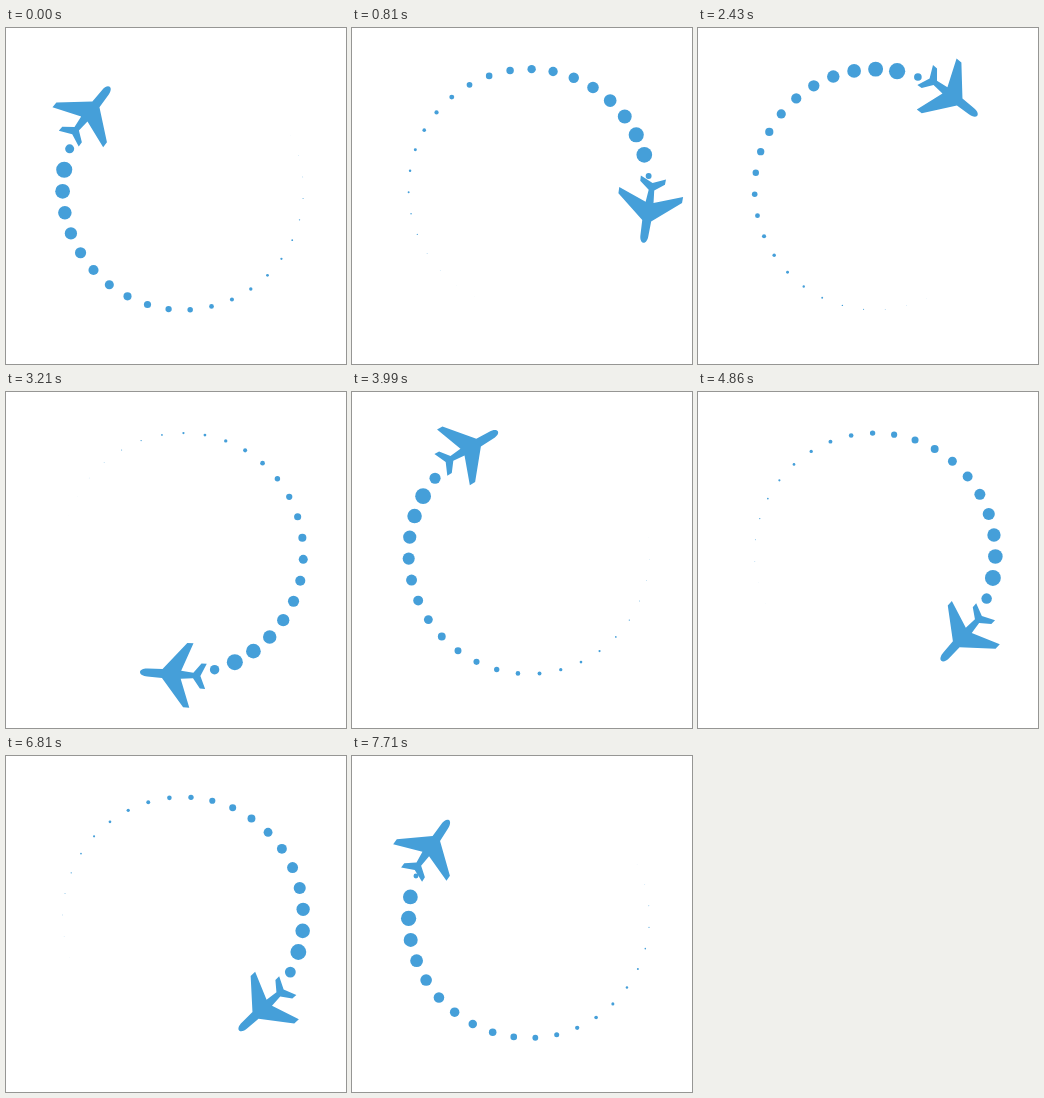
These frames come from a looping animation (340 px wide and 336 px high, 7740 ms). An HTML page:

```html
<!DOCTYPE html>
<html lang="en">
<head>
<meta charset="utf-8">
<title>Plane loader</title>
<style>
  html, body { margin: 0; width: 100%; height: 100%; overflow: hidden; background: #fff; }
  svg { display: block; width: 340px; height: 336px; fill: #459fd9; }
</style>
</head>
<body>
<svg viewBox="0 0 340 336">
  <g id="dots"></g>
  <!-- local axes: x points away from the ring centre, y along the flight -->
  <path id="plane" d="M0 30.5 C2.4 30.5 4 27 4 23 L4.5 8.2 L32.2 -14.8 L32.3 -21 L4 -10.5
    L2.8 -22.8 L12.5 -30.3 L12.7 -35.6 L0 -30 L-12.7 -35.6 L-12.5 -30.3 L-2.8 -22.8
    L-4 -10.5 L-32.3 -21 L-32.2 -14.8 L-4.5 8.2 L-4 23 C-4 27 -2.4 30.5 0 30.5 Z"/>
</svg>
<script>
const LOOP = 7740, TICK = 30;
const CX = 177, CY = 161.5, RADIUS = 120.4, PLANE_RADIUS = 121.2;
const COUNT = 35, GAP = 360 / COUNT;
const DRIFT = -10 * GAP / LOOP;          // the ring creeps backwards ten gaps per loop
const MAX_R = 8.2, GROW_FROM = 11.3, FULL_AT = 28.5, FADE = 250;

// plane position on the ring: [ms, degrees], four turns with slightly uneven speed
const FLIGHT = [
  [0, 220.5], [1590, 516], [2430, 670.2], [3990, 961.7],
  [5700, 1281.3], [6810, 1489.6], [7710, 1656.6], [7740, 1660.5]
];

const plane = document.getElementById('plane');
const group = document.getElementById('dots');
const dots = Array.from({ length: COUNT }, () =>
  group.appendChild(document.createElementNS('http://www.w3.org/2000/svg', 'circle')));

function planeAngle(t) {
  const i = FLIGHT.findIndex(step => step[0] > t);
  const [t0, a0] = FLIGHT[i - 1], [t1, a1] = FLIGHT[i];
  return a0 + (a1 - a0) * (t - t0) / (t1 - t0);
}

// a dot swells quickly behind the tail, then shrinks along the trail
function dotRadius(lag) {
  if (lag < GROW_FROM) return 0;
  if (lag < FULL_AT) return MAX_R * (lag - GROW_FROM) / (FULL_AT - GROW_FROM);
  const left = Math.max(0, 1 - (lag - FULL_AT) / FADE);
  return MAX_R * left * left;
}

function draw(t) {
  const head = planeAngle(t);
  plane.setAttribute('transform',
    `translate(${CX} ${CY}) rotate(${head}) translate(${PLANE_RADIUS} 0) rotate(-2.2)`);
  dots.forEach((dot, i) => {
    const deg = 4.3 + i * GAP + DRIFT * t;
    const rad = deg * Math.PI / 180;
    const lag = (((head - deg) % 360) + 360) % 360;
    dot.setAttribute('cx', CX + RADIUS * Math.cos(rad));
    dot.setAttribute('cy', CY + RADIUS * Math.sin(rad));
    dot.setAttribute('r', dotRadius(lag));
  });
}

const start = performance.now();
function frame() {
  const t = (performance.now() - start) % LOOP;
  draw(Math.floor(t / TICK) * TICK);
  requestAnimationFrame(frame);
}
frame();
</script>
</body>
</html>
```
